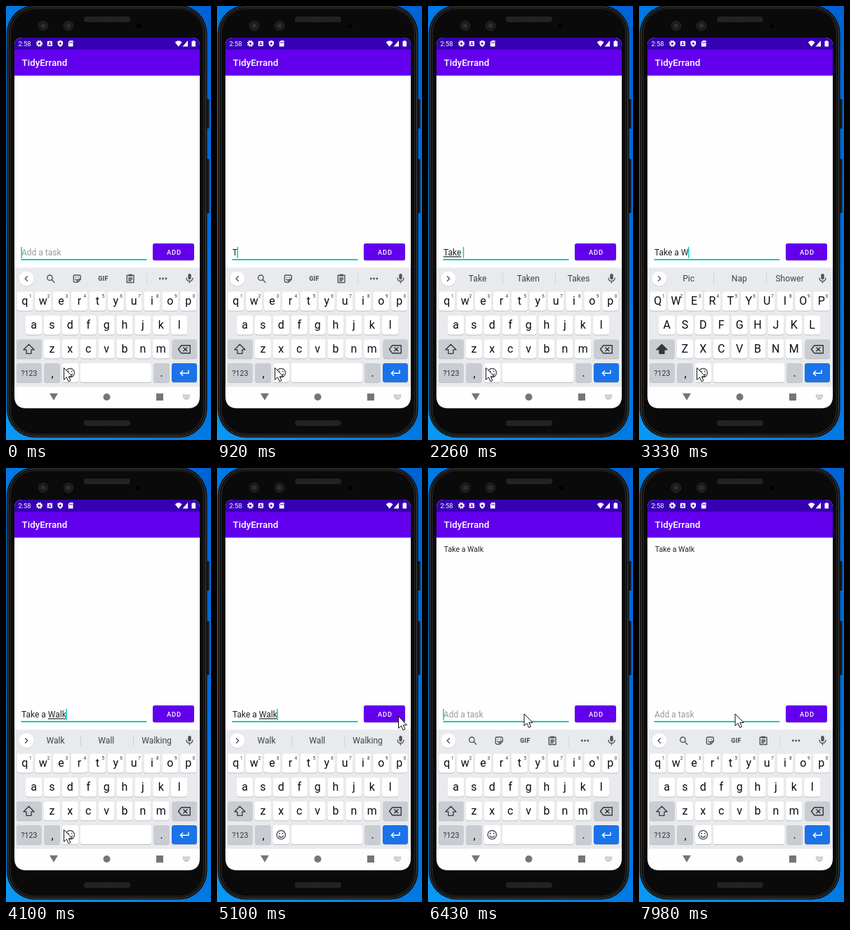
Recreate the animation shown at these times as an HTML page. Size 292 px wide and 616 px high, loop 8 s.

```html
<!DOCTYPE html>
<html lang="en">
<head>
<meta charset="utf-8">
<title>Task list on a phone</title>
<style>
  html, body { margin: 0; width: 100%; height: 100%; overflow: hidden; background: #0078e0; }
  svg { display: block; width: 292px; height: 616px; }
  text { font-family: Roboto, "Noto Sans", sans-serif; white-space: pre; }
  .mid { text-anchor: middle; }
  .line { fill: none; stroke: #50545a; stroke-width: 1.4; stroke-linecap: round; stroke-linejoin: round; }
  .ink { fill: #50545a; }
  .letter { font-size: 16px; fill: #0b0c0e; }
  .word { font-size: 12.1px; fill: #3f4348; }
</style>
</head>
<body>
<svg viewBox="0 0 292 616">
  <defs>
    <linearGradient id="desk" x1="0" x2="1" y1="1" y2="0">
      <stop offset="0" stop-color="#0a98f5"/><stop offset=".5" stop-color="#0079e2"/><stop offset="1" stop-color="#0062d4"/>
    </linearGradient>
    <pattern id="mesh" width="3" height="3" patternUnits="userSpaceOnUse">
      <rect width="3" height="3" fill="#1c1c1c"/><path d="M0 3L3 0" stroke="#303030"/>
    </pattern>
    <clipPath id="screen"><path d="M12 56Q12 45 23 45H265Q276 45 276 56V554Q276 571 259 571H29Q12 571 12 554Z"/></clipPath>
  </defs>

  <!-- Phone body -->
  <rect width="292" height="616" fill="url(#desk)"/>
  <rect x="285" y="132" width="4.5" height="42" rx="1.5" fill="#191919"/>
  <rect x="285" y="217" width="4.5" height="77" rx="1.5" fill="#191919"/>
  <rect x="1" y="-1" width="285.5" height="613.5" rx="40" fill="#0c0c0c"/>
  <rect x="3" y="1" width="281.5" height="609.5" rx="38" fill="#101010" stroke="#444"/>
  <rect x="6.2" y="3.7" width="275.2" height="604.2" rx="35.5" fill="#0a0a0a" stroke="#2c2c2c"/>
  <rect x="111" y="15" width="66" height="8" rx="4" fill="url(#mesh)"/>
  <rect x="111" y="588" width="66" height="8" rx="4" fill="url(#mesh)"/>
  <g id="lenses"></g>
  <circle cx="189" cy="28" r="5" fill="#030303" stroke="#141414"/>

  <g clip-path="url(#screen)">
    <rect x="12" y="45" width="264" height="526" fill="#fefefe"/>
    <rect x="12" y="45" width="264" height="17" fill="#3700b3"/>
    <rect x="12" y="62" width="264" height="36.8" fill="#6200ee"/>

    <!-- Status bar -->
    <g fill="#fff">
      <text x="17.5" y="56.8" font-size="9.4">2:58</text>
      <circle cx="47.5" cy="53.3" r="2.6" fill="none" stroke="#fff" stroke-width="1.9"/>
      <circle cx="47.5" cy="53.3" r="4" fill="none" stroke="#fff" stroke-width="1.3" stroke-dasharray="1.7 1.44"/>
      <rect x="58.8" y="49.8" width="7.2" height="7.2" rx="1"/>
      <text class="mid" x="62.4" y="55.7" font-size="6.3" font-weight="700" fill="#3700b3">A</text>
      <path d="M77.3 48.7L81 50.2V53Q81 56.2 77.3 58Q73.6 56.2 73.6 53V50.2Z"/>
      <circle cx="77.3" cy="53.2" r="1.5" fill="#3700b3"/>
      <path d="M91 49H95.5V57.5H88.8V51.3Z"/>
      <path d="M90.6 51.2V53M92.3 50.6V53M94 50.6V53" stroke="#3700b3" stroke-width=".8"/>
      <path d="M240.8 51.4Q245.7 47.3 250.6 51.4L245.7 57.7Z"/>
      <path d="M259 49V57.5H251.5Z"/>
      <path d="M264.5 50H266V49H268.4V50H270V57.6H264.5Z"/>
      <text x="22.6" y="85" font-size="13.4" font-weight="500">TidyErrand</text>
    </g>

    <!-- List and entry row -->
    <text id="item" x="22.7" y="118.7" font-size="10.6" fill="#222">Take a Walk</text>
    <text id="hint" x="22" y="354.3" font-size="12" fill="#9a9a9a">Add a task</text>
    <text x="22" y="354.3" font-size="12" fill="#222"><tspan id="typed"></tspan><tspan id="composed"></tspan><tspan id="tail"></tspan></text>
    <rect x="21.5" y="359" width="179" height="2" fill="#03cdbb"/>
    <rect id="caret" y="342" width="1.5" height="15.7" fill="#03cdbb"/>
    <rect x="209" y="338" width="59" height="24" rx="3" fill="#000" opacity=".15"/>
    <rect id="button" x="209" y="337" width="59" height="24" rx="2.8" fill="#6200ee"/>
    <text class="mid" x="239.4" y="352.7" font-size="9.4" font-weight="500" letter-spacing=".84" fill="#fff">ADD</text>

    <!-- Keyboard -->
    <rect x="12" y="371.5" width="264" height="169" fill="#e8eaed"/>
    <circle cx="29" cy="387.8" r="10.6" fill="#c9cccf"/>
    <circle cx="29" cy="387" r="10.5" fill="#fff"/>
    <path id="chevron" class="line"/>
    <g id="tools">
      <circle class="line" cx="62.4" cy="385.7" r="3.7"/><path class="line" d="M65.2 388.6L68.8 392.2" stroke-width="1.8"/>
      <path class="line" d="M98 382H104.5Q106.2 382 106.2 383.7V388L102.2 392H98Q96.3 392 96.3 390.3V383.7Q96.3 382 98 382ZM102.2 392V389.7Q102.2 388 104 388H106.2M98.8 387.8Q100 389.8 102 388.6"/>
      <circle class="ink" cx="99.3" cy="385.2" r=".8"/><circle class="ink" cx="103.2" cy="385.2" r=".8"/>
      <text class="mid ink" x="138.4" y="390.2" font-size="8.8" font-weight="900" letter-spacing=".3">GIF</text>
      <path class="line" d="M172.3 382.2H182V392.5H172.3ZM174.7 386H179.6M174.7 388H179.6M174.7 390H178"/>
      <rect class="ink" x="174.5" y="380.7" width="5.2" height="3"/>
      <path d="M200.5 379V395" stroke="#d5d7da"/>
      <g id="dots" class="ink"></g>
    </g>
    <g id="words">
      <path d="M106.5 379V395M181.5 379V395" stroke="#d0d3d6"/>
      <text class="mid word" x="70.6" y="391.3"></text>
      <text class="mid word" x="142.8" y="391.3"></text>
      <text class="mid word" x="214.6" y="391.3"></text>
    </g>
    <rect class="ink" x="259.3" y="380" width="4.4" height="8.2" rx="2.2"/>
    <path class="line" d="M257 386.2Q257.3 390.5 261.5 390.5T266 386.2M261.5 390.5V393"/>
    <g id="keys"></g>
    <path id="shift" d="M32.5 480.3L40 487.8H36V493.3H29V487.8H25Z" stroke="#33363a" stroke-width="1.3" stroke-linejoin="round"/>
    <path class="line" d="M249.8 481.7H262.3V492.8H249.8L245.5 487.2ZM252.8 484.7L258 489.8M258 484.7L252.8 489.8" style="stroke:#33363a"/>
    <text class="mid" x="33" y="525" font-size="10.6" fill="#303338">?123</text>
    <text class="mid letter" x="66" y="527">,</text>
    <text class="mid letter" x="221.5" y="526">.</text>
    <circle class="line" cx="91.3" cy="520.7" r="6.2"/>
    <circle class="ink" cx="89" cy="518.8" r="1"/><circle class="ink" cx="93.6" cy="518.8" r="1"/>
    <path class="line" d="M88 522.3Q91.3 526.3 94.6 522.3"/>
    <path class="line" d="M260 517.3V521.2H248.5M251.6 518L248.4 521.2L251.6 524.4" style="stroke:#fff"/>

    <!-- Navigation bar -->
    <path d="M62 549.7H74L68 559.7Z" fill="#757575"/>
    <circle cx="143.5" cy="555" r="5" fill="#757575"/>
    <rect x="214" y="550" width="10" height="10" fill="#757575"/>
    <path d="M252 552.5H262M252 555H262" stroke="#8a8a8a" stroke-width="1.4" stroke-dasharray="1.3 .85"/>
    <path d="M254 557.5H260" stroke="#8a8a8a" stroke-width="1.2"/>
  </g>
  <path id="pointer" d="M0 0V17L3.9 13.4L6.6 19.5L9.4 18.2L6.8 12.4H12Z" fill="#fff" stroke="#111" stroke-width="1" stroke-linejoin="round"/>
</svg>

<script>
const LOOP = 8000;
const $ = id => document.getElementById(id);
const letters = [];

function key(x, y, w, fill) {
  const rect = (dy, color) =>
    `<rect x="${x}" y="${y + dy}" width="${w}" height="27" rx="3.4" fill="${color}"/>`;
  return rect(1, "#bcbfc3") + rect(0, fill);
}

function buildKeys() {
  const rows = [["qwertyuiop", 26.8, 405.5], ["asdfghjkl", 39.6, 439.4], ["zxcvbnm", 65.4, 473.2]];
  let out = "";
  rows.forEach(([chars, left, y], row) => [...chars].forEach((ch, i) => {
    const x = left + i * 25.88;
    out += key(x - 11.5, y, 23, "#fff");
    out += `<text class="mid letter" x="${x}" y="${y + 18.7}">${ch}</text>`;
    if (!row) out += `<text class="mid" x="${x + 7.9}" y="${y + 8}" font-size="6.4" fill="#333">${(i + 1) % 10}</text>`;
  }));
  const grey = "#c9cdd2";
  out += key(15, 473.2, 36, grey) + key(236.5, 473.2, 35.5, grey) + key(15, 507, 36, grey)
    + key(54, 507, 23, grey) + key(80, 507, 23, "#fff") + key(105.7, 507, 101.3, "#fff")
    + key(210, 507, 23, grey) + key(236, 507, 36, "#1a73e8");
  $("keys").innerHTML = out;
  letters.push(...$("keys").querySelectorAll(".letter"));
}

$("lenses").innerHTML = [53, 89].map(x =>
  `<circle cx="${x}" cy="28" r="6.8" fill="#1b1b1b" stroke="#282828"/><circle cx="${x}" cy="28" r="3.2" fill="#332d2d"/>`).join("");
$("dots").innerHTML = [219.3, 223.6, 227.9].map(x => `<circle cx="${x}" cy="387" r="1.4"/>`).join("");
buildKeys();

// Each step overrides part of the state. text = [plain, underlined, tail]
const steps = [
  [0, { text: ["", "", ""], words: "", caps: 0, caret: 1, item: 0, button: "#6200ee", at: [82.5, 513.5] }],
  [120, { caret: 0 }],
  [660, { caret: 1 }],
  [800, { caps: 1 }],
  [920, { caps: 0, text: ["T", "", ""] }],
  [1070, { text: ["", "T", ""], words: "The To This" }],
  [1350, { text: ["", "T", "a"] }],
  [1470, { text: ["", "Ta", ""] }],
  [1620, { text: ["", "Ta", "k"], words: "Ta Take Talk" }],
  [1740, { text: ["", "Tak", ""] }],
  [1860, { text: ["", "Tak", "e"], words: "Tak Take Taki" }],
  [1980, { text: ["", "Take", ""], words: "Take Taken Takes" }],
  [2260, { text: ["", "Take", " "] }],
  [2540, { text: ["Take a", "", ""], words: "a the it" }],
  [2660, { text: ["Take ", "a", ""] }],
  [2910, { text: ["Take ", "a", " "], words: "a any as" }],
  [3190, { text: ["Take a ", "", ""], words: "Pic Nap Shower" }],
  [3330, { text: ["Take a W", "", ""], caps: 1 }],
  [3450, { text: ["Take a ", "W", ""], caps: 0, words: "W We Will" }],
  [3580, { text: ["Take a ", "W", "a"] }],
  [3700, { text: ["Take a ", "Wa", "l"], words: "Wa Walk Was" }],
  [3850, { text: ["Take a Walk", "", ""], words: "Wal Walk Wall" }],
  [4100, { text: ["Take a ", "Walk", ""], words: "Walk Wall Walking" }],
  [4530, { caret: 0 }],
  [4680, { at: [81.5, 458.5] }],
  [4830, { at: [79.5, 357.5] }],
  [4970, { at: [180, 361], caret: 1 }],
  [5100, { at: [258.5, 352.5] }],
  [5500, { button: "#8133f1" }],
  [5650, { button: "#6d14ef", text: ["", "", ""], item: .6 }],
  [5800, { button: "#6200ee", item: 1, at: [247.5, 363] }],
  [5920, { words: "", at: [197, 364] }],
  [6060, { caret: 0, at: [168, 359] }],
  [6180, { at: [150, 354] }],
  [6300, { at: [140, 350] }],
  [6430, { caret: 1, at: [137, 349] }],
  [6960, { caret: 0 }],
  [7520, { caret: 1 }],
  [7980, { caret: 0 }]
];

const show = (id, on) => $(id).style.display = on ? "" : "none";
const wordSlots = $("words").querySelectorAll("text");
$("composed").style.textDecoration = "underline";
let lastStep = -1;

function draw(t) {
  const current = steps.filter(([start]) => start <= t);
  if (current.length === lastStep) return;
  lastStep = current.length;
  const s = Object.assign({}, ...current.map(([, change]) => change));

  ["typed", "composed", "tail"].forEach((id, i) => $(id).textContent = s.text[i]);
  const width = $("typed").parentNode.getComputedTextLength();
  $("caret").setAttribute("x", 21.4 + width);
  show("caret", s.caret);
  show("hint", !s.text.join(""));

  const words = s.words.split(" ");
  show("tools", !s.words);
  show("words", s.words);
  wordSlots.forEach((slot, i) => slot.textContent = words[i] || "");
  $("chevron").setAttribute("d", s.words ? "M27.5 383.7L30.8 387L27.5 390.3" : "M30.5 383.7L27.2 387L30.5 390.3");

  letters.forEach(el => el.textContent = s.caps ? el.textContent.toUpperCase() : el.textContent.toLowerCase());
  $("shift").setAttribute("fill", s.caps ? "#33363a" : "none");
  $("item").setAttribute("opacity", s.item);
  $("button").setAttribute("fill", s.button);
  $("pointer").setAttribute("transform", `translate(${s.at})`);
}

const origin = performance.now();
function tick() {
  draw((performance.now() - origin) % LOOP);
  requestAnimationFrame(tick);
}
tick();
</script>
</body>
</html>
```
